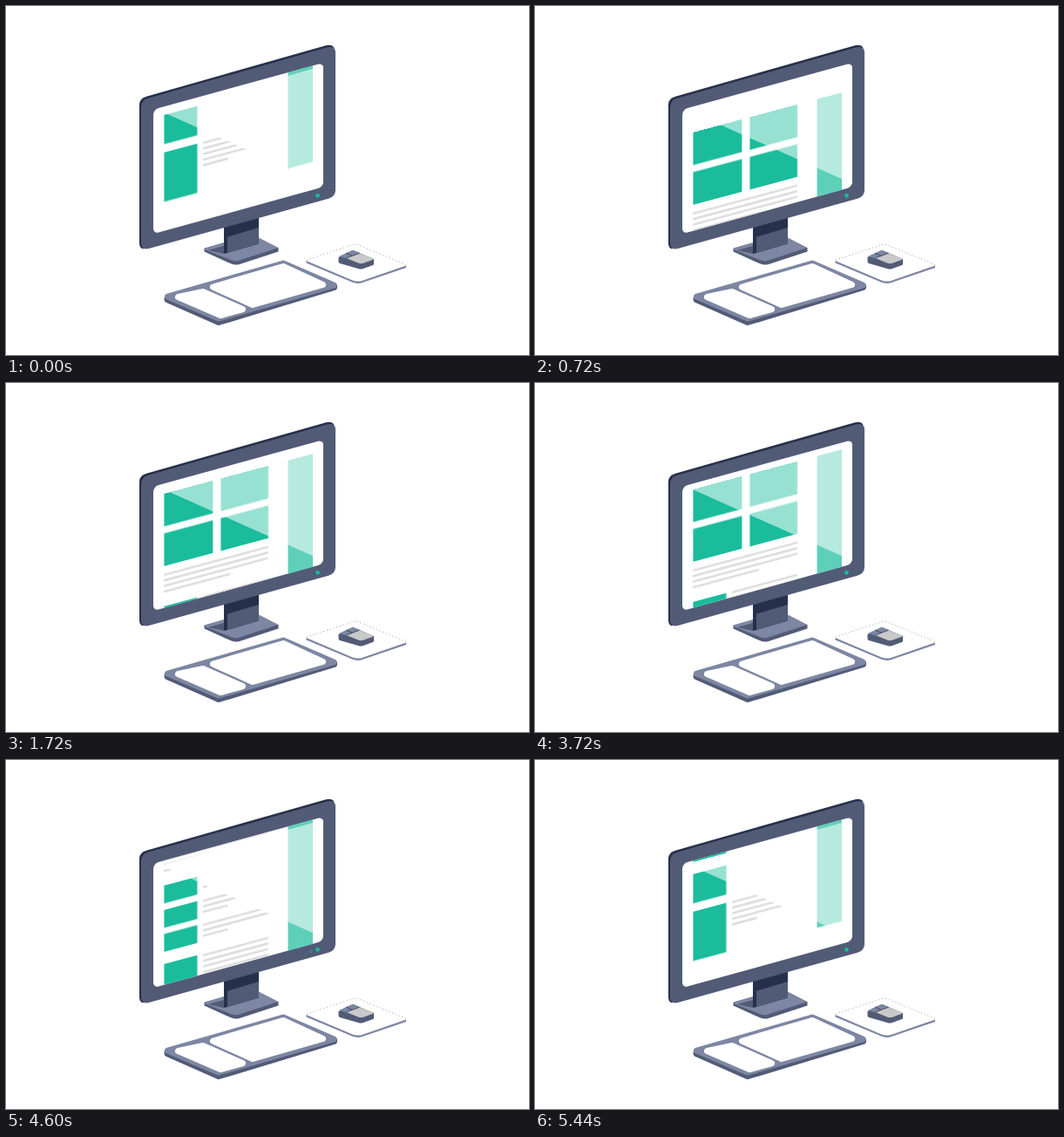
Recreate the animation shown at these times as an HTML page without scripts. Size 600 by 400 pixels, loop 5480 ms.

```html
<!DOCTYPE html>
<html lang="en">
<head>
<meta charset="utf-8">
<title>Scrolling page on a desktop screen</title>
<style>
  html, body { margin: 0; width: 100%; height: 100%; overflow: hidden; background: #fff; }
  svg { display: block; width: 100vw; height: 100vh; }

  .dark  { fill: #27304a; }
  .body  { fill: #525b76; }
  .light { fill: #7d86a2; }
  .green { fill: #1abc9c; }
  .white { fill: #fff; }
  .soft  { stroke-width: 7; stroke-linejoin: round; }
  .soft.body  { stroke: #525b76; }
  .soft.light { stroke: #7d86a2; }
  .soft.white { stroke: #fff; }
  .lines { fill: none; stroke: #dcdcdc; stroke-width: 2.6; }

  .page { animation: scroll 5480ms -4ms infinite; }
  .blink { animation: blink 5480ms step-end infinite; }

  /* The page advances one tile (355) per loop, drifts back a little, then rests. */
  @keyframes scroll {
    0%       { transform: translateY(-221px); animation-timing-function: steps(9); }
    6.5693%  { transform: translateY(-280px); animation-timing-function: steps(9); }
    13.1387% { transform: translateY(-337px); animation-timing-function: steps(9); }
    19.708%  { transform: translateY(-383px); animation-timing-function: steps(4); }
    22.6277% { transform: translateY(-391px); animation-timing-function: steps(4); }
    25.5474% { transform: translateY(-387px); animation-timing-function: steps(4); }
    28.4672% { transform: translateY(-374px); animation-timing-function: steps(4); }
    31.3869% { transform: translateY(-355px); animation-timing-function: steps(1); }
    67.8832% { transform: translateY(-360px); animation-timing-function: steps(22); }
    83.9416% { transform: translateY(-467px); animation-timing-function: steps(21); }
    99.2701% { transform: translateY(-570px); animation-timing-function: steps(1); }
    100%     { transform: translateY(-576px); }
  }
  @keyframes blink {
    0%, 22%, 87% { opacity: 0; }
    16%, 80% { opacity: 1; }
    100% { opacity: 0; }
  }
</style>
</head>
<body>
<svg viewBox="0 0 600 400">
  <defs>
    <rect id="screen" x="14" y="122.6" width="195" height="142.4" rx="6"/>
    <clipPath id="view">
      <use href="#screen" transform="translate(155) skewY(-15.4)"/>
    </clipPath>
    <path id="gloss" d="M178.500 121 364 68.500V203.500Z"/>

    <g id="boxes" class="green">
      <path d="M.4 0h56v37.500h-56zM65.400 0H120v37.500H65.400zM.4 45.500h56V83h-56zM65.400 45.500H120V83H65.400z"/>
      <path d="M.4 129h38v20.500h-38zM.4 157h38v20.500h-38zM.4 184.500h38V205h-38zM.4 219h38v33.500h-38zM.4 262h38v56.500h-38z"/>
      <path d="M142.500 0H171v318.500h-28.500z" opacity=".7"/>
    </g>

    <g id="three" class="lines">
      <path d="M45 0h75M45 6.4h75M45 12.8h28.5"/>
    </g>
    <g id="copy" class="lines">
      <path d="M0 93h120M0 99.4h120M0 105.8h120M0 112.2h76"/>
      <use href="#three" y="130"/>
      <use href="#three" y="158.5"/>
      <use href="#three" y="186"/>
      <path d="M45 221h75M45 227.4h75M45 233.8h75M45 240.2h75"/>
      <path d="M45 263h75M45 269.4h75M45 275.8h75M45 282.2h75M45 288.6h28.5"/>
    </g>
  </defs>

  <!-- stand -->
  <path class="body" d="M227.500 278V281.500L258 295.300Q263 297.500 268 296L312.500 281.500V277Z"/>
  <path class="light" d="M227.500 277.500 250 271 290 265.500 312.500 277 267 291.800Q263 293 259 291.500L227.500 279Z"/>
  <path class="body" d="M232 280 250 275V284Z"/>
  <path class="dark" d="M250 240h40V272.500L254 283 250 284Z"/>
  <path class="body" d="M254 264.700 290 254V272.500L254 283Z"/>

  <!-- monitor -->
  <path class="dark" d="M153 272V113Q153 106 161 103.700L367 45.300Q373 43.800 376 47V60L157 278.500Q153 277 153 272Z"/>
  <path class="body" d="M155 116Q155 108 163 105.700L369 47.300Q378 45.500 378 53V211Q378 218.500 370 220.800L164 278Q155 280 155 272Z"/>
  <use href="#screen" class="white" transform="translate(155) skewY(-15.4)"/>
  <circle class="green" cx="357.5" cy="217.3" r="2.4"/>
  <circle class="blink" cx="349.8" cy="219.6" r="2" fill="#3a7c87"/>

  <!-- scrolling page: copy is hidden behind the gloss, boxes shine through it -->
  <g clip-path="url(#view)">
    <g transform="translate(181 127) skewY(-15)">
      <g class="page">
        <use href="#copy"/>
        <use href="#copy" y="355"/>
      </g>
    </g>
    <use href="#gloss" class="white"/>
    <g transform="translate(181 127) skewY(-15)">
      <g class="page">
        <use href="#boxes"/>
        <use href="#boxes" y="355"/>
      </g>
    </g>
    <use href="#gloss" class="white" opacity=".55"/>
  </g>

  <!-- keyboard -->
  <path class="body soft" d="M185 335 318 297 376.500 321V322.500L244 362.500 185 336.500Z"/>
  <path class="light soft" d="M185.500 333 318 295 376 320 244 358Z"/>
  <path class="white soft" d="M197.500 333.500 226 327.500 271.500 347.500 246 354.500Z"/>
  <path class="white soft" d="M237.500 322 318 298.500 363.500 319.500 283 342.500Z"/>

  <!-- mouse pad and mouse -->
  <path class="light" d="M344.500 292V294.500L397 316.500Q403 319 409 317L459 300V297.500Z"/>
  <path class="white" d="M344.500 292 397 274.500Q401 273 405 274.500L459 297.500 409 314.700Q403 316.700 397 314.300Z"/>
  <path d="M345 291 397 274Q401 272.800 405 274.200L459 296.500" fill="none" stroke="#525b76" stroke-width=".6" stroke-dasharray="1 3"/>
  <path class="body" d="M381.500 288V293Q381.500 294.500 383 295L404 301Q407 302 410 301L421 297Q422 296.500 422 295.500V290L398 280Z"/>
  <path class="light" d="M382 287 396 280.500Q398 279.700 400 280.500L407 283.500 391 289.500Z"/>
  <path d="M390.500 289 405.500 283.500 421 289.500Q422 290.200 421 290.700L410 294.700Q407 295.600 404.500 294.700Z" fill="#c9c9c9"/>
  <path d="M390 283 397 286.400M390.500 289 405.500 283.300" fill="none" stroke="#27304a" stroke-width=".7"/>
</svg>
</body>
</html>
```
